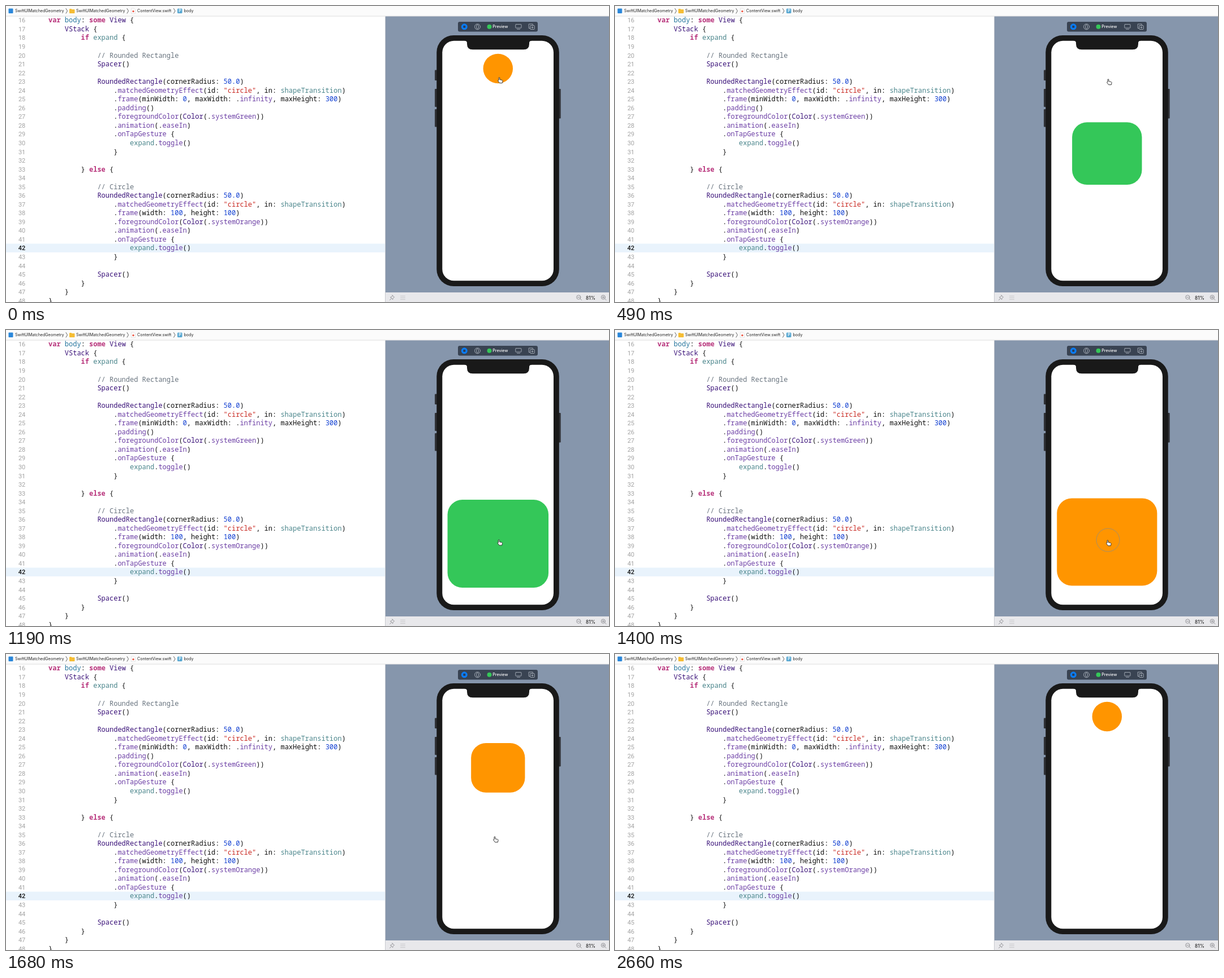
An HTML page that plays this animation: 1066x525 px, repeating every 2870 ms.

```html
<!DOCTYPE html>
<html lang="en">
<head>
<meta charset="utf-8">
<title>Matched geometry preview</title>
<style>
html, body { margin: 0; width: 100%; height: 100%; overflow: hidden; background: #fff; }
svg { display: block; width: 100%; height: 100%; }
.ui { font: 7.1px Inter, "Open Sans", sans-serif; fill: #262626; }
.code { font: 500 12px "Noto Sans Mono", "Liberation Mono", monospace; fill: #111; }
.num { font: 11px Roboto, Inter, sans-serif; fill: #a3a3a3; text-anchor: end; }
.num.now { fill: #111; font-weight: 500; }
.key { fill: #b8347c; font-weight: 600; }
.type { fill: #3a1279; }
.member { fill: #6c3fa5; }
.own { fill: #4a858b; }
.decl { fill: #24749c; }
.lit { fill: #1240d2; }
.str { fill: #c92a23; }
.note { fill: #69747f; }
.line { fill: none; stroke-width: .9; stroke-linecap: round; stroke-linejoin: round; }
</style>
</head>
<body>
<svg viewBox="0 0 1066 525">
  <rect y="421.5" width="671" height="15.5" fill="#e9f3fc"/>
  <g id="code"></g>

  <!-- path bar -->
  <rect width="1066" height="18" fill="#fbfbfb"/>
  <path d="M0 18H1066" stroke="#d4d4d4" stroke-width=".8"/>
  <rect x="4.5" y="4.5" width="8" height="8.5" rx="1" fill="#2b87da"/>
  <path d="M112 6q0-1 1-1h2.5l1 1h4q1 0 1 1v5q0 1-1 1h-7.500q-1 0-1-1z" fill="#f5bd35"/>
  <path d="M221.500 4h5l2 2v7.500h-7z" fill="#fff" stroke="#d5d5d5" stroke-width=".6"/>
  <circle cx="225" cy="9.500" r="1.700" fill="#ec5a47"/>
  <rect x="303" y="4.500" width="8.500" height="8.500" rx="1.500" fill="#58a8d2"/>
  <path class="line" stroke="#555" d="M106 4.500l2.500 4.300-2.500 4.300M214 4.500l2.500 4.300-2.500 4.300M296.500 4.500l2.500 4.300-2.500 4.300"/>
  <g class="ui">
    <text x="16" y="11.300">SwiftUIMatchedGeometry</text>
    <text x="124" y="11.300">SwiftUIMatchedGeometry</text>
    <text x="232" y="11.300">ContentView.swift</text>
    <text x="314.500" y="11.300">body</text>
    <text x="305.200" y="11.300" style="fill:#fff;font-weight:600">P</text>
  </g>

  <!-- preview canvas -->
  <rect x="671" y="18.400" width="395" height="490" fill="#8696ac"/>
  <rect x="670" y="18.400" width="1" height="507" fill="#c9cbd0"/>
  <rect x="671" y="508" width="395" height="17" fill="#e8e8eb"/>
  <g class="line" stroke="#8a8a8e">
    <path d="M683 513l3.500 3.500-1 .4-1.500 1.700-.3 2-4.200-4.200 2-.3 1.500-1.700zM681.500 518.500l-3 3"/>
    <path d="M697.500 514.500h8M697.500 517.500h8M697.500 520.500h8" stroke="#c3c3c7"/>
    <path d="M1015 519l2.500 2.500M1010.500 516.500h3.500M1058.500 519l2.500 2.500M1054 516.500h3.500M1055.800 514.800v3.500"/>
    <circle cx="1012.300" cy="516.500" r="3.600"/>
    <circle cx="1055.800" cy="516.500" r="3.600"/>
  </g>
  <text class="ui" x="1033.500" y="520.500" text-anchor="middle" style="font-size:8.300px;font-weight:500">81%</text>

  <!-- phone -->
  <g fill="#303236">
    <rect x="758" y="113.500" width="5" height="18.500" rx="1"/>
    <rect x="758" y="147" width="5" height="32" rx="1"/>
    <rect x="758" y="183" width="5" height="31.500" rx="1"/>
    <rect x="976" y="147" width="4.700" height="52.500" rx="1"/>
  </g>
  <rect x="761.300" y="52" width="216.500" height="445" rx="30" fill="#191919"/>
  <rect x="771.300" y="61.800" width="196.700" height="425.500" rx="20.500" fill="#fff"/>
  <path d="M811 61h118v.8q-4 0-4 4v1.500q0 10-10 10h-90q-10 0-10-10v-1.500q0-4-4-4z" fill="#191919"/>

  <!-- preview controls -->
  <rect x="799" y="28" width="141" height="17.500" rx="3" fill="#394352"/>
  <circle cx="810.300" cy="36.800" r="5.500" fill="#0a7cf5"/>
  <rect x="808.300" y="34.800" width="4" height="4" rx=".7" fill="#2a3d59"/>
  <g class="line" stroke="#aab1bc">
    <circle cx="833.500" cy="36.800" r="5"/>
    <rect x="831.700" y="33.500" width="3.600" height="6.600" rx=".8"/>
    <rect x="900.800" y="32.500" width="10.200" height="6.500" rx=".8"/>
    <path d="M903.500 41.200h5M926.500 39.500h-2.300v-7.500h7v2"/>
    <rect x="926.800" y="34.500" width="7.400" height="7" rx=".8"/>
    <path d="M930.500 36.500v3M929 38h3"/>
  </g>
  <circle cx="854.500" cy="36.800" r="4" fill="#35c759"/>
  <text class="ui" x="860.300" y="39.400" style="fill:#fff;font-weight:500">Preview</text>

  <rect id="shape"/>
  <circle id="ring" r="20.500" fill="none" stroke="#8e8c83" stroke-width=".8"/>
  <path id="hand" d="M-3-4.200c0-1.500 1.900-1.500 1.900 0v2.800l3.900.9c1.100.3 1.400 1 1.200 2l-.7 3.200h-4.700l-2.800-3.800c-.6-1 .5-1.800 1.200-.9z"
    fill="#fff" stroke="#222" stroke-width=".9" stroke-linejoin="round"/>
</svg>

<script>
const source = `    var body: some View {
        VStack {
            if expand {

                // Rounded Rectangle
                Spacer()

                RoundedRectangle(cornerRadius: 50.0)
                    .matchedGeometryEffect(id: "circle", in: shapeTransition)
                    .frame(minWidth: 0, maxWidth: .infinity, maxHeight: 300)
                    .padding()
                    .foregroundColor(Color(.systemGreen))
                    .animation(.easeIn)
                    .onTapGesture {
                        expand.toggle()
                    }

            } else {

                // Circle
                RoundedRectangle(cornerRadius: 50.0)
                    .matchedGeometryEffect(id: "circle", in: shapeTransition)
                    .frame(width: 100, height: 100)
                    .foregroundColor(Color(.systemOrange))
                    .animation(.easeIn)
                    .onTapGesture {
                        expand.toggle()
                    }

                Spacer()
            }
        }
    }`;

const kinds = ['note', 'str', 'key', 'lit', 'type', 'own', 'decl', 'member'];
const token = /(\/\/.*)|("[^"]*")|\b(var|some|if|else)\b|(\d[\d.]*)|\b(RoundedRectangle|VStack|Spacer|View|Color)\b|\b(expand|shapeTransition)\b|\b(body)\b|(?<=\.)(\w+)/g;
const paint = text => text.replace(token, (word, ...groups) =>
  `<tspan class="${kinds[groups.findIndex(g => g !== undefined)]}">${word}</tspan>`);

const $ = id => document.getElementById(id);
$('code').innerHTML = source.split('\n').map((row, i) => {
  const y = 29.4 + i * 15.54, n = i + 16, text = row.trim();
  const x = 46.2 + (row.length - text.length) * 7.2;
  return `<text class="num${n === 42 ? ' now' : ''}" x="34.3" y="${y}">${n}</text>` +
    `<text class="code" x="${x}" y="${y}">${paint(text)}</text>`;
}).join('');

const LOOP = 2870, STEP = 70, DURATION = 401, OPEN = 207, CLOSE = 1368;
// time, x, y of the pointer
const path = [
  [0, 874, 132], [490, 874, 135], [560, 874, 142], [770, 877, 357], [910, 874, 376],
  [1400, 873, 378], [1560, 866, 378], [1960, 866, 152], [2240, 867, 150],
  [2450, 889, 129], [2520, 889, 129], [2590, 936, 41], [2660, 936, 41]
];

const set = (el, attrs) => Object.entries(attrs).forEach(([k, v]) => el.setAttribute(k, v));
const mix = (a, b, p) => a + (b - a) * p;

// cubic-bezier(.42, 0, 1, 1)
function easeIn(x) {
  if (x <= 0) return 0;
  if (x >= 1) return 1;
  let lo = 0, hi = 1;
  const y = s => s * s * (3 - 2 * s);
  for (let i = 0; i < 20; i++) {
    const s = (lo + hi) / 2;
    if (1.26 * s * (1 - s) ** 2 + y(s) < x) lo = s; else hi = s;
  }
  return y(lo);
}

function pointer(t) {
  const i = Math.max(1, path.findIndex(p => p[0] > t));
  const [a, b] = [path[i - 1], path[i]];
  const u = (t - a[0]) / (b[0] - a[0]), p = u * u * (3 - 2 * u);
  return [mix(a[1], b[1], p), mix(a[2], b[2], p)];
}

function draw(t) {
  const p = easeIn((t - OPEN) / DURATION) - easeIn((t - CLOSE) / DURATION);
  const w = mix(52.5, 178.5, p), h = mix(52.5, 156, p);
  set($('shape'), {
    x: 869.8 - w / 2, y: mix(110.9, 379, p) - h / 2, width: w, height: h, rx: 26.25,
    fill: t >= OPEN && t < CLOSE ? '#34c759' : '#ff9500'
  });

  const shown = t < 2660;
  $('hand').style.display = shown ? '' : 'none';
  const pressed = [OPEN, CLOSE].some(c => t >= c - 40 && t < c + 90);
  $('ring').style.display = pressed ? '' : 'none';
  if (!shown) return;
  const [x, y] = pointer(t);
  set($('hand'), { transform: `translate(${x} ${y})` });
  set($('ring'), { cx: x - 1.5, cy: y - 5.5 });
}

const start = performance.now();
function tick() {
  const t = (performance.now() - start) % LOOP;
  draw(Math.floor(t / STEP) * STEP);
  requestAnimationFrame(tick);
}
tick();
</script>
</body>
</html>
```
